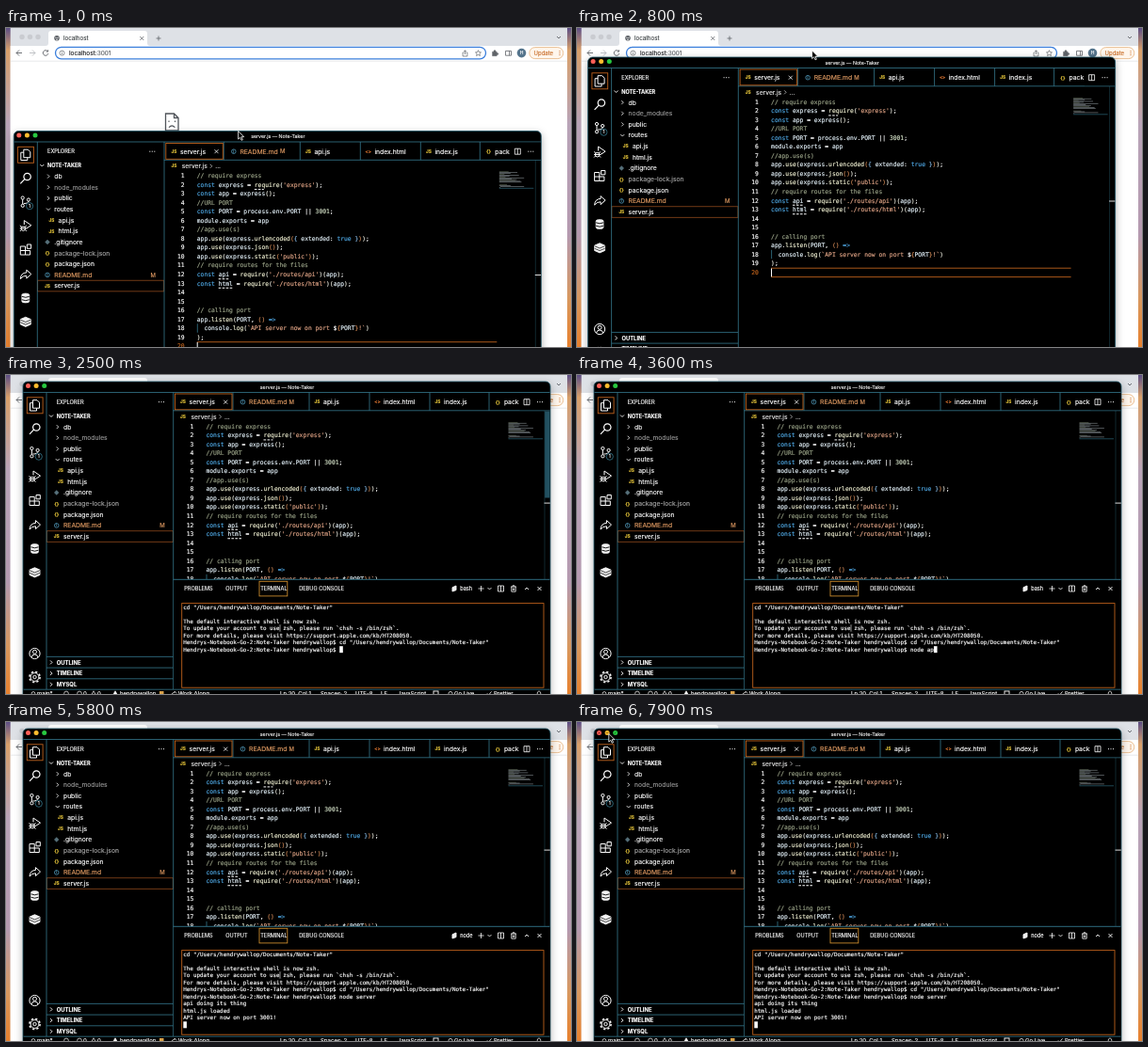
Animation, 600 px wide and 339 px high, one loop 8000 ms. Source, as an HTML page:

```html
<!DOCTYPE html>
<html lang="en">
<head>
<meta charset="utf-8">
<title>Note-Taker</title>
<style>
html, body { margin: 0; width: 100%; height: 100%; overflow: hidden; background: #fff; }
svg { display: block; width: 600px; height: 339px; }
text { white-space: pre; font-family: Inter, "Liberation Sans", sans-serif; }
text, tspan { fill: currentColor; stroke: currentColor; stroke-width: .16px; }
.mono { font-family: "DejaVu Sans Mono", "Liberation Mono", monospace; }
#win { filter: drop-shadow(0 3px 4px rgba(0, 0, 0, .3)); }
</style>
</head>
<body>
<svg id="stage" viewBox="0 0 600 339"></svg>
<script>
const CYAN = '#35798f', ORANGE = '#bd611c', RUST = '#7d4019', YELLOW = '#e3c33a';
const MODIFIED = '#df9a62', GREY = '#969696', WHITE = '#fff';
const CHAR = 3.815, ROW = 9.53, CODE_X = 212.5, CODE_Y = 54.4;
const TERM_CHAR = 3.53, TERM_ROW = 7.53, TERM_X = 188.3, TERM_Y = 246.5;

const code = [
  '// require express',
  "const express = require('express');",
  'const app = express();',
  '//URL PORT',
  'const PORT = process.env.PORT || 3001;',
  'module.exports = app',
  '//app.use(s)',
  'app.use(express.urlencoded({ extended: true }));',
  'app.use(express.json());',
  "app.use(express.static('public'));",
  '// require routes for the files',
  "const api = require('./routes/api')(app);",
  "const html = require('./routes/html')(app);",
  '', '',
  '// calling port',
  'app.listen(PORT, () =>',
  '  console.log(`API server now on port ${PORT}!`)',
  ');',
  ''
];

// drawing helpers; text is placed by its vertical centre
const text = (x, y, s, size = 6.75, color = WHITE, more = '') =>
  `<text x="${x}" y="${(y + size * .36).toFixed(2)}" font-size="${size}" color="${color}" ${more}>${s}</text>`;
const mono = (x, y, s, size, color = WHITE, more = '') => text(x, y, s, size, color, `class="mono" ${more}`);
const rect = (x, y, w, h, fill, more = '') =>
  `<rect x="${x}" y="${y}" width="${w}" height="${h}" fill="${fill}" ${more}/>`;
const frame = (x, y, w, h, color, more = '') => rect(x, y, w, h, 'none', `stroke="${color}" stroke-width=".9" ${more}`);
const circle = (x, y, r, fill, more = '') => `<circle cx="${x}" cy="${y}" r="${r}" fill="${fill}" ${more}/>`;
const ring = (x, y, r, color = WHITE, w = 1, more = '') =>
  circle(x, y, r, 'none', `stroke="${color}" stroke-width="${w}" ${more}`);
const line = (d, color = WHITE, w = .8, more = '') =>
  `<path d="${d}" fill="none" stroke="${color}" stroke-width="${w}" ${more}/>`;
const icon = (x, y, d, color = WHITE, w = 1, fill = 'none') =>
  `<path transform="translate(${x} ${y})" d="${d}" fill="${fill}" stroke="${color}" stroke-width="${w}" stroke-linejoin="round"/>`;
const badge = (s, size, color) => (x, y) => text(x, y, s, size, color, 'text-anchor="middle" font-weight="700"');
const js = badge('JS', 4.7, YELLOW), braces = badge('{}', 5.4, YELLOW), html = badge('&lt;&gt;', 4.7, '#e37933');
const info = (x, y) => ring(x, y, 2.3, '#519aba', .8) + text(x, y, 'i', 4, '#519aba', 'text-anchor="middle"');
const RIGHT = 'M-1 -2L1 0L-1 2', DOWN = 'M-2 -1L0 1L2 -1', UP = 'M-2 1L0 -1L2 1', CROSS = 'M-2 -2L2 2M2 -2L-2 2';
const SPLIT = 'M-3 -3H3V3H-3ZM0 -3V3', DOTS = 'M-3 0h1M-.5 0h1M2 0h1';

function browser() {
  const ink = '#5f6368';
  return rect(0, 0, 600, 339, 'url(#desk)') +
    rect(4.7, -8, 591.3, 400, '#dee1e6', 'rx="4"') +
    rect(4.7, 19, 591.3, 330, WHITE) +
    [17, 25.5, 34].map(x => circle(x, 9.5, 2.7, '#c9cbd0')).join('') +
    '<path d="M42 19q3 0 3-3V6q0-3 3-3h99q3 0 3 3v10q0 3 3 3z" fill="#fff"/>' +
    circle(54, 10.8, 2.8, ink) + line('M52 10q2 2 4 0M53 12.5h2', WHITE, .6) +
    text(61, 11, 'localhost', 6.2, '#3c4043') +
    icon(144.3, 11, CROSS, ink, .8) + icon(162, 11, 'M-2.5 0H2.5M0 -2.5V2.5', ink, .8) +
    icon(587, 10, DOWN, ink, .9) +
    icon(14, 26.5, 'M3 0H-3M0 -3L-3 0L0 3', ink, .9) +
    icon(28, 26.5, 'M-3 0H3M0 -3L3 0L0 3', '#b9bcc0', .9) +
    icon(42, 26.5, 'M2.2 -1.8A2.8 2.8 0 1 0 2.8 .6M2.6 -3.2V-1.4H.8', ink, .9) +
    rect(52.5, 20.3, 457, 12.6, WHITE, 'rx="6.3" stroke="#3b7fdc" stroke-width="1.3"') +
    ring(59.5, 26.6, 2.5, ink, .7) + line('M59.5 26.2v1.8M59.5 24.8v.7', ink, .7) +
    text(67, 26.7, 'localhost<tspan color="#5f6368">:3001</tspan>', 6.5, '#202124') +
    icon(487.5, 27, 'M-1 -1H-2.4V3H2.4V-1H1M0 1V-3M-1.3 -2L0 -3.3L1.3 -2', ink, .7) +
    icon(501.5, 26.7, 'M0 -3L.9 -1L3 -.8L1.4 .7L1.9 2.8L0 1.7L-1.9 2.8L-1.4 .7L-3 -.8L-.9 -1Z', ink, .7) +
    icon(519, 26.7, 'M-2.5 -1.5H-.8A1 1 0 1 1 .8 -1.5H2.2V0A1 1 0 1 1 2.2 1.6V3H-2.5Z', ink, .4, ink) +
    icon(533.5, 26.7, 'M-3 -2.3H3V2.5H-3ZM1 -2.3V2.5', ink, .8) +
    circle(547.5, 26.6, 4.8, '#54748c') + text(547.5, 26.6, 'H', 5, WHITE, 'text-anchor="middle"') +
    rect(555.8, 20.6, 36, 12, '#fff6ec', 'rx="6" stroke="#e8b98a" stroke-width=".9"') +
    text(560.5, 26.7, 'Update', 6, '#c9702c') +
    [24.6, 26.6, 28.6].map(y => circle(588, y, .6, '#c9702c')).join('') +
    line('M5 35.2H596', '#dadce0', .6) +
    line('M169.5 91H178.5L183 95.5V109H169.5ZM178.5 91V95.5H183', '#50545a', 1.3) +
    line('M173 98.5v1.6M179.5 98.5v1.6M173 105.6q3.2 -3.4 6.4 0', '#50545a', 1.1);
}

function activity() {
  const x = 30.5;
  return frame(22.3, 23.8, 16.8, 17, ORANGE) +
    icon(x, 32.2, 'M-2 -5.5H2.5L5 -3V3H-2ZM-2 -2.5H-5V5.8H2V3') +
    icon(x, 57, 'M5.5 -1.5A3.7 3.7 0 1 1 -1.9 -1.5A3.7 3.7 0 1 1 5.5 -1.5M-1 1.2L-5.5 5.8', WHITE, 1.2) +
    ring(27.4, 78, 1.6) + ring(27.4, 86.3, 1.6) + ring(33.6, 80, 1.6) +
    line('M27.4 79.6V84.7M33.6 81.6Q33.5 84 28.5 84', WHITE, 1) +
    circle(34.8, 86.7, 3.6, '#000', `stroke="${CYAN}" stroke-width=".8"`) +
    text(34.8, 86.7, '1', 4.8, WHITE, 'text-anchor="middle"') +
    icon(x, 107.5, 'M-1.5 -1V-5.5L6 -.3L.8 3M-4.5 1.2H-.5V4.5Q-2.5 6.5 -4.5 4.5ZM-6 0L-4.5 1.2M1 0L-.5 1.2M-6 3H1M-6 6L-4.5 4.5M1 6L-.5 4.5') +
    icon(x, 133, 'M-5.5 -3.5H-.3V5.5H-5.5ZM-5.5 1H4.8V5.5H-.3M1.5 -5.5H5.8V-1.2H1.5Z') +
    icon(x, 159.6, 'M-5.5 4.5Q-5 -2 1 -2.2V-5L6 -.5L1 4V1.2Q-3 1 -5.5 4.5Z') +
    icon(x, 184.5, 'M-4 -3.4A4 1.6 0 1 1 4 -3.4V3.4A4 1.6 0 1 1 -4 3.4Z', WHITE, .6, '#f2f2f2') +
    line('M26.5 182.8q4 2 8 0M26.5 186.2q4 2 8 0', '#000', .9) +
    icon(x, 209.7, 'M-5.5 -2.6L0 -5L5.5 -2.6V2.8L0 5.2L-5.5 2.8Z', WHITE, .8, '#f2f2f2') +
    line('M25 207.7L30.5 210L36 207.7M25 210.3L30.5 212.6L36 210.3', '#000', .7) +
    ring(x, 296, 5.6) + ring(x, 294.3, 2) + line('M27 300q.5 -3 3.5 -3t3.5 3', WHITE, 1) +
    ring(x, 321, 4.4) + ring(x, 321, 1.7) + ring(x, 321, 5.6, WHITE, 1.5, 'stroke-dasharray="2.2"');
}

function sidebar() {
  const rowY = i => 43.5 + 11.64 * i;
  const files = [
    ['db', 'dir'], ['node_modules', 'dir', GREY], ['public', 'dir'], ['routes', 'open'],
    ['api.js', 'js', WHITE, 4.3], ['html.js', 'js', WHITE, 4.3], ['.gitignore', 'git'],
    ['package-lock.json', 'json', '#a6a6a6'], ['package.json', 'json'], ['README.md', 'info', MODIFIED], ['server.js', 'js']
  ];
  const marks = {
    dir: (x, y) => icon(x + 1, y, RIGHT, WHITE, .8),
    open: (x, y) => icon(x + 1, y, DOWN, WHITE, .8),
    git: (x, y) => icon(x, y, 'M0 -2.4L2.4 0L0 2.4L-2.4 0Z', '#56707a', .5, '#56707a'),
    js, json: braces, info
  };
  let out = text(53.7, 28.7, 'EXPLORER', 5.65) + icon(165, 28.7, DOTS) +
    icon(48, 43.5, DOWN, WHITE, .9) + text(53.7, 43.5, 'NOTE-TAKER', 5.55, WHITE, 'font-weight="700"');
  files.forEach(([name, kind, color = WHITE, shift = 0], i) => {
    const y = rowY(i + 1);
    out += marks[kind](53.7 + shift, y) + text(61 + shift, y, name, 6.75, color);
  });
  out += text(163.3, rowY(10), 'M', 6, MODIFIED) + frame(43.3, rowY(11) - 5.8, 134, 11.6, RUST);
  ['OUTLINE', 'TIMELINE', 'MYSQL'].forEach((s, i) => {
    const y = 305.4 + 11.7 * i;
    out += line(`M43 ${y - 6}H177.5`, CYAN) + icon(48, y, RIGHT, WHITE, .9) +
      text(53.8, y, s, 5.85, WHITE, 'font-weight="700"');
  });
  return out;
}

function tabs() {
  const names = ['server.js', 'README.md', 'api.js', 'index.html', 'index.js', 'pack'];
  const marks = [js, info, js, html, js, braces];
  const left = [179, 241, 322, 386, 450, 513];
  const iconX = [188, 251.5, 330.5, 394.5, 458.5, 522.3];
  let out = line('M18.5 18.5H577.5M177.5 37.8H577.5', CYAN);
  names.forEach((s, i) => {
    out += marks[i](iconX[i], 28.7) + text(iconX[i] + 6.6, 28.7, s, 6.8, i == 1 ? MODIFIED : WHITE);
    if (i) out += line(`M${left[i]} 18.5V37.8`, CYAN);
  });
  return out + frame(179.5, 20, 60.5, 16.8, ORANGE) +
    icon(233.2, 28.7, CROSS, WHITE, .8) + text(300.6, 28.7, 'M', 6, MODIFIED) +
    rect(545.5, 19.2, 32, 18, '#000') + icon(553, 28.7, SPLIT, WHITE, .8) + icon(567, 28.7, DOTS) +
    js(188, 44.3) + text(196.5, 44.3, 'server.js', 6.75, '#e6e6e6') +
    icon(227.5, 44.3, RIGHT, '#ddd', .7) + text(232, 44.3, '...', 6.6, '#ddd');
}

function paint(src) {
  let depth = 0;
  const brackets = ['#ecece0', '#c98352', '#7fb2dc'];
  return src.replace(/\/\/.*|'[^']*'|`[^$]*|!`|\b(?:const|true)\b|=>|\d+|[(){}]|\w+(?=\()|\w+/g, m => {
    let c = '#e4f2fa';
    if (m.startsWith('//')) c = '#98a186';
    else if (/^['`!]/.test(m)) c = '#dfa385';
    else if (/^(const|true|=>)$/.test(m)) c = '#4fa8e4';
    else if (/^\d/.test(m)) c = '#d5e2c8';
    else if (/[({]/.test(m)) c = brackets[depth++ % 3];
    else if (/[)}]/.test(m)) c = brackets[Math.max(0, --depth) % 3];
    else if (/^(require|use|urlencoded|json|static|listen|log)$/.test(m)) c = '#f0f0d2';
    return `<tspan color="${c}">${m}</tspan>`;
  });
}

function editor() {
  const dash = (row, col, n) => {
    const y = CODE_Y + ROW * row + 5;
    return line(`M${CODE_X + CHAR * col} ${y}h${CHAR * n}`, WHITE, 1, 'stroke-dasharray="2.6 1.4"');
  };
  let out = '';
  code.forEach((s, i) => {
    const y = CODE_Y + ROW * i;
    out += mono(199.3, y, i + 1, 6.34, i == 19 ? ORANGE : WHITE, 'text-anchor="end"') +
      mono(CODE_X, y, paint(s), 6.34);
    const indent = s.search(/\S/);
    if (s) out += rect(533.5 + indent * .55, 50 + i * .92, (s.length - indent) * .55, .55,
      s.startsWith('//') ? '#77866c' : '#b4c0c6', 'opacity=".8"');
  });
  return out + dash(1, 16, 2.6) + dash(11, 6, 3) + dash(12, 6, 4) +
    line('M213 211.8v9.4', CYAN, .8) +
    line('M533.5 67.8H570', CYAN, .6) +
    line('M212.5 231.2H531M212.5 240.6H531', ORANGE, .9) + rect(212.4, 231.5, 1, 8.8, WHITE) +
    line('M572 38V334', '#1d4450', .6);
}

function panel() {
  let out = rect(178, 217, 399.5, 117, '#000') + line('M177.5 217.3H577.5', CYAN, .9);
  [[189.3, 'PROBLEMS'], [233.2, 'OUTPUT'], [270.2, 'TERMINAL'], [311.2, 'DEBUG CONSOLE']]
    .forEach(([x, s]) => out += text(x, 227, s, 5.6));
  return out + rect(572.2, 38.5, 5.2, 92, '#2b6478', 'id="slider" opacity=".8"') +
    frame(269, 219.3, 29.8, 15.6, '#c98a2c') +
    icon(476, 227, 'M-2 -1.2L2 -3V1.6L-2 3Z', WHITE, .9, '#eee') +
    '<g id="shell"></g>' +
    icon(504.5, 227, 'M-3 0H3M0 -3V3', WHITE, .8) + icon(513.5, 227, DOWN, WHITE, .8) +
    icon(525.5, 227, SPLIT, WHITE, .8) + icon(539, 227, 'M-3 -2H3M-1 -2V-3.2H1V-2M-2.2 -2V3.2H2.2V-2M-.7 -.5V2M.7 -.5V2', WHITE, .8) +
    icon(553, 227, UP, WHITE, .9) + icon(566.5, 227, CROSS, WHITE, .9) +
    frame(186.7, 242.6, 384.3, 89.6, ORANGE) + '<g id="term"></g>';
}

function status() {
  const items = [[33, 'main*'], [82, '0'], [97, '0'], [121, 'hendrywallop'], [183, 'Work Along'], [291, 'Ln 20, Col 1'],
    [334, 'Spaces: 2'], [371, 'UTF-8'], [398, 'LF'], [416, 'JavaScript'], [476, 'Go Live'], [518, 'Prettier']];
  const y = 338.4;
  return rect(18.5, 334, 559, 60, '#000') + line('M18.5 334.2H577.5', CYAN) +
    items.map(([x, s]) => text(x, y, s, 6)).join('') +
    ring(29, y, 1.8, WHITE, .7) + ring(64, y, 2.3, WHITE, .7) + ring(78, y, 2.3, WHITE, .7) +
    icon(93, y, 'M0 -2.6L2.6 2H-2.6Z', WHITE, .7) + icon(116, y, 'M0 -2.6L2.6 2H-2.6Z', WHITE, .7, WHITE) +
    rect(163, 336, 4.5, 5, '#d9a24a') + icon(178, y, 'M-2.5 2Q-2 -1 1 -1V-2.4L3 0', WHITE, .7) +
    frame(454, 336, 5, 5, WHITE) + ring(472, y, 2, WHITE, .7) +
    icon(513, y, 'M-2 0L-.5 1.8L2.5 -2', WHITE, .8) + icon(566, y, 'M-2 1.5Q-2 -2.5 0 -2.5T2 1.5Z', WHITE, .7);
}

const stage = document.getElementById('stage');
stage.innerHTML =
  `<defs><linearGradient id="desk" x2="0" y2="1">
    <stop offset="0" stop-color="#5d4f86"/><stop offset=".07" stop-color="#d9a06a"/>
    <stop offset=".3" stop-color="#b9a4b8"/><stop offset=".65" stop-color="#b59ab0"/>
    <stop offset=".85" stop-color="#d8985f"/><stop offset="1" stop-color="#e8812e"/></linearGradient></defs>` +
  browser() + '<g id="win">' +
  rect(18, 7, 560, 400, '#000', 'rx="5" stroke="#1d5566" stroke-width=".8"') +
  ['#ff5f57', '#febc2e', '#28c840'].map((c, i) => circle(23.5 + 8.6 * i, 11.6, 2.5, c)).join('') +
  '<g id="hover">' + icon(23.5, 11.6, 'M-1 -1L1 1M1 -1L-1 1', '#5a0f0a', .6) +
  icon(32.1, 11.6, 'M-1.4 0H1.4', '#6b4700', .7) + icon(40.7, 11.6, 'M-1 1L1 -1', '#0b5a17', .7) + '</g>' +
  text(298.5, 12.8, 'server.js — Note-Taker', 5.3, '#eee', 'text-anchor="middle"') +
  activity() + sidebar() + line('M43 18.5V334M177.7 18.5V334', CYAN) + editor() + tabs() +
  `<g id="panel">${panel()}</g>` + status() + rect(571.5, 0, 6.3, 1, '#ddd', 'id="mark"') + '</g>' +
  '<path id="arrow" d="M0 0V8.6L2 6.8L3.4 9.8L4.8 9.2L3.4 6.2H6.2Z" fill="#000" stroke="#fff" stroke-width=".8"/>' +
  '<path id="beam" d="M-1.2 -3.4Q0 -3.4 0 -2.6V2.6Q0 3.4 -1.2 3.4M1.2 -3.4Q0 -3.4 0 -2.6V2.6Q0 3.4 1.2 3.4" fill="none" stroke="#aaa" stroke-width=".5"/>';

const el = id => document.getElementById(id);
const show = (id, on) => el(id).style.display = on ? '' : 'none';
const move = (id, x, y) => el(id).setAttribute('transform', `translate(${x.toFixed(2)} ${y.toFixed(2)})`);

// rows of [time, x, y]
const winPath = [[0, -9.7, 102.5], [300, -9, 75], [600, -7.6, 43], [800, -6.4, 24], [1000, -2, 7], [1200, 0, 0], [8000, 0, 0]];
const mousePath = [[0, 246.6, 109.5], [300, 247.5, 77], [600, 249, 41], [800, 249.6, 24], [1000, 254, 12], [1200, 256.5, 9],
  [1500, 260.3, 108], [1900, 260.3, 108], [2300, 291, 269], [6600, 291, 269], [7300, 150, 118], [7700, 35, 15], [7900, 33.8, 12.5], [8000, 33.8, 12.5]];

function along(path, t) {
  const i = Math.max(1, path.findIndex(p => p[0] >= t));
  const [a, b] = [path[i - 1], path[i]];
  const k = (t - a[0]) / (b[0] - a[0]);
  return [a[1] + (b[1] - a[1]) * k, a[2] + (b[2] - a[2]) * k];
}

const cd = 'cd "/Users/hendrywallop/Documents/Note-Taker"';
const prompt = 'Hendrys-Notebook-Go-2:Note-Taker hendrywallop$ ';
const typed = [[0, ''], [2900, 'n'], [3000, 'no'], [3100, 'nod'], [3200, 'node'], [3300, 'node '], [3400, 'node a'],
  [3600, 'node ap'], [3800, 'node app'], [4100, 'node ap'], [4200, 'node a'], [4300, 'node '], [4500, 'node s'],
  [4700, 'node se'], [4800, 'node ser'], [4900, 'node serv'], [5000, 'node serve'], [5100, 'node server']];

function termLines(t) {
  if (t < 2200) return [''];
  if (t < 2300) return [cd, ''];
  const out = [cd, '', 'The default interactive shell is now zsh.',
    'To update your account to use zsh, please run `chsh -s /bin/zsh`.',
    'For more details, please visit https://support.apple.com/kb/HT208050.', prompt + cd,
    prompt + typed.filter(s => s[0] <= t).pop()[1]];
  if (t >= 5500) out.push('api doing its thing', 'html.js loaded', 'API server now on port 3001!');
  if (t >= 5300) out.push('');
  return out;
}

function draw(t) {
  const [x, y] = along(mousePath, t);
  const beam = t > 1200 && x > 178 && y > 38, open = t >= 2100;
  move('win', ...along(winPath, t));
  move('arrow', x, y);
  move('beam', x, y);
  show('arrow', !beam);
  show('beam', beam);
  show('hover', t >= 7700);
  show('panel', open);
  show('slider', t < 3000);
  el('mark').setAttribute('y', open ? 135.6 : 159.5);
  const rows = termLines(t), end = rows.length - 1;
  el('term').innerHTML = rows.map((s, i) => mono(TERM_X, TERM_Y + TERM_ROW * i, s, 5.86)).join('') +
    rect(TERM_X + TERM_CHAR * rows[end].length, TERM_Y + TERM_ROW * end - 3.5, 3.6, 7, WHITE);
  el('shell').innerHTML = text(482.2, 227, t >= 5400 ? 'node' : 'bash', 5.6);
}

const start = performance.now();
let last = -1;
function tick() {
  const t = Math.floor((performance.now() - start) % 8000 / 100) * 100;
  if (t !== last) draw(last = t);
  requestAnimationFrame(tick);
}
tick();
</script>
</body>
</html>
```
